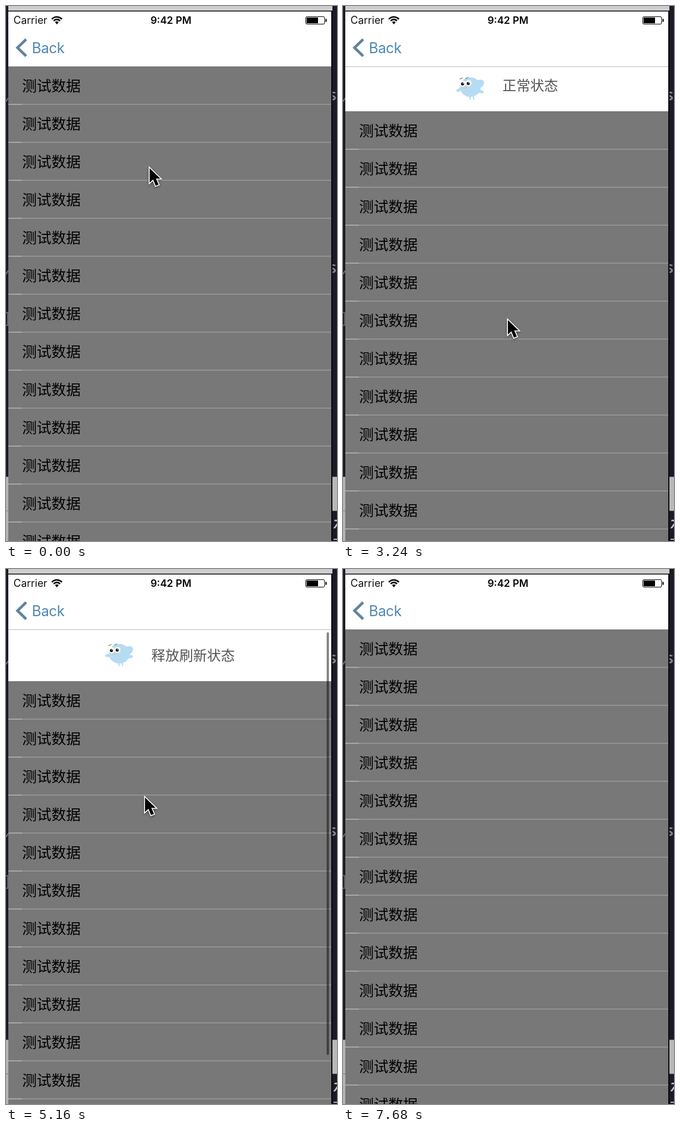
Write an HTML page with a canvas that moves like this. It is 576 px wide and 930 px high and loops after 7.74 s.

```html
<!DOCTYPE html>
<html lang="zh">
<head>
<meta charset="utf-8">
<title>下拉刷新</title>
<style>
html, body { margin: 0; width: 100%; height: 100%; overflow: hidden; background: #1c1a26; }
canvas { display: block; width: 576px; height: 930px; }
</style>
</head>
<body>
<canvas id="stage" width="576" height="930"></canvas>
<script>
const ctx = document.getElementById('stage').getContext('2d');
const LOOP = 7740, STEP = 60, TAU = Math.PI * 2;
const LEFT = 4, RIGHT = 566, WIDTH = RIGHT - LEFT, BOTTOM = 930;
const NAV = 105, ROW = 66, HEADER = 90;
const LATIN = 'Inter, Roboto, sans-serif';
const CJK = '"Noto Sans CJK SC", "Noto Sans CJK", "Noto Sans CJK JP", sans-serif';
const MONO = '"Noto Sans Mono", monospace';
const TINT = '#4a8cbc', BIRD = '#b5dcf2';

// Smooth step from 0 to 1 between two times
function ease(t, from, to) {
  const u = Math.min(1, Math.max(0, (t - from) / (to - from)));
  return u * u * (3 - 2 * u);
}

// First pull overshoots, settles on the header, then closes; the second is let down slowly
function pullAt(t) {
  const first = 120 * ease(t, 300, 1020) - 30 * ease(t, 1140, 1440)
    - HEADER * ease(t, 3180, 3447);
  const second = 91 * (ease(t, 4200, 5212) - ease(t, 6300, 7260));
  return first + second;
}

function barAlphaAt(t) {
  return ease(t, 300, 360) - ease(t, 1500, 1740) + ease(t, 4200, 4260) - ease(t, 7260, 7500);
}

function mouseAt(t) {
  let x = 249, y = 279;
  const glide = (from, to, toX, toY) => {
    const u = ease(t, from, to);
    x += (toX - x) * u;
    y += (toY - y) * u;
  };
  glide(300, 1020, 286, 543);
  glide(3300, 4140, 228, 298);
  glide(4200, 5212, 241, 395);
  glide(5800, 6780, 245, 378);
  glide(7140, 7620, 590, 430);
  return [x, y];
}

function rect(x, y, w, h, color) {
  ctx.fillStyle = color;
  ctx.fillRect(x, y, w, h);
}

function pill(x, y, w, h, r) {
  ctx.beginPath();
  ctx.roundRect(x, y, w, h, r);
}

function text(str, x, y, font, color, align = 'left') {
  ctx.font = font;
  ctx.fillStyle = color;
  ctx.textAlign = align;
  ctx.fillText(str, x, y);
}

function oval(x, y, rx, ry, color, turn = 0) {
  ctx.fillStyle = color;
  ctx.beginPath();
  ctx.ellipse(x, y, rx, ry, turn, 0, TAU);
  ctx.fill();
}

function line(x1, y1, x2, y2, width, color) {
  ctx.strokeStyle = color;
  ctx.lineWidth = width;
  ctx.beginPath();
  ctx.moveTo(x1, y1);
  ctx.lineTo(x2, y2);
  ctx.stroke();
}

function clipped(x, y, w, h, paint) {
  ctx.save();
  ctx.beginPath();
  ctx.rect(x, y, w, h);
  ctx.clip();
  paint();
  ctx.restore();
}

function drawBackdrop() {
  rect(0, 0, 576, BOTTOM, '#1c1a26');
  for (const y of [164, 464]) {
    text('S', 562, y, `bold 22px ${MONO}`, '#85888c');
    line(0, y + 2, LEFT, y - 4, 2, '#70737a');
  }
  ctx.strokeStyle = '#777a80';
  ctx.lineWidth = 1.5;
  ctx.strokeRect(-9, 533, 12, 22);
  rect(0, 818, LEFT, BOTTOM - 818, '#b4b4b4');
  rect(RIGHT, 818, 10, 60, '#b9b9b9');
  for (const y of [818, 877]) rect(0, y, 576, 1, '#777');
  text('7', 567, 908, `italic bold 21px ${MONO}`, '#c4c4c8');
  rect(570, 926, 6, 2, '#b4b4b8');
  rect(LEFT, 0, WIDTH + 2, 8, '#cdcdcd');
  rect(LEFT, 8, WIDTH + 2, BOTTOM, '#080808');
  rect(LEFT, 9.5, WIDTH, BOTTOM, '#fff');
}

function drawBird(x, y, lift) {
  ctx.save();
  ctx.translate(x, y + 3 - lift * 9);
  ctx.lineCap = 'round';
  for (const foot of [0, 6]) line(foot - 1, 13, foot, 21, 2.2, BIRD);
  // Wings, body and tail
  oval(-17, 4 - lift * 2, 8, 3, BIRD, lift * 0.4 - 0.4);
  oval(16, 7 - lift * 3, 8, 3, BIRD, 0.3 - lift * 0.5);
  oval(0, 0, 18, 17, BIRD);
  oval(15, -5, 10, 7, BIRD, -0.6);
  // Brows and eyes
  for (const ex of [-13, -3]) {
    const ey = -7 - ex / 13;
    line(ex - 5, ey - 8, ex - 1, ey - 10, 1.5, '#8b8f94');
    oval(ex, ey, 5.3, 5.3, '#fff');
    oval(ex - 0.5, ey + 0.5, 2.7, 2.7, '#151515');
    oval(ex + 0.4, ey - 0.6, 0.8, 0.8, '#fff');
  }
  oval(-9, 1, 3, 1.7, '#d9c8b0', -0.2);
  ctx.restore();
}

function drawHeader(top, offset, t) {
  const ready = offset >= HEADER - 0.5;
  const label = ready ? '释放刷新状态' : '正常状态';
  const x = ready ? 253 : 277.5;
  const mid = top - HEADER / 2;
  const lift = ready ? (1 - Math.cos((t - 1020) / 499 * TAU)) / 2 : 0;
  const write = () => text(label, x, mid + 9, `24.2px ${CJK}`, '#555');
  clipped(LEFT, NAV, WIDTH, BOTTOM - NAV, () => {
    drawBird(x - 56, mid, lift);
    write();
  });
  // Faint blur of the label behind the translucent bar
  clipped(LEFT, 86, WIDTH, NAV - 86, () => {
    ctx.globalAlpha = 0.12;
    ctx.filter = 'blur(7px)';
    write();
  });
}

function drawList(top) {
  rect(LEFT, top, WIDTH, BOTTOM - top, '#787878');
  for (let y = top; y < BOTTOM; y += ROW) {
    text('测试数据', 28, y + 43, `25.5px ${CJK}`, '#000');
    rect(LEFT, y + ROW - 0.5, WIDTH, 1, '#acacac');
    rect(LEFT, y + ROW - 0.5, 24, 1, '#c0c0c0');
  }
}

function drawSignal(x, y) {
  const fan = r => ctx.arc(x, y, r, -TAU * 0.38, -TAU * 0.12);
  ctx.strokeStyle = ctx.fillStyle = '#000';
  ctx.lineWidth = 2.6;
  for (const r of [12, 7.6]) {
    ctx.beginPath();
    fan(r);
    ctx.stroke();
  }
  ctx.beginPath();
  ctx.moveTo(x, y + 1);
  fan(4.3);
  ctx.fill();
}

function drawBattery(x, y) {
  ctx.strokeStyle = '#000';
  ctx.lineWidth = 1;
  pill(x + 0.5, y + 0.5, 33, 13, 2.5);
  ctx.stroke();
  rect(x + 2, y + 2, 20, 10, '#000');
  rect(x + 35, y + 4.5, 2, 5, '#000');
}

function drawNav(offset) {
  text('Carrier', 13, 31, `18px ${LATIN}`, '#111');
  text('9:42 PM', 287, 31, `600 17.5px ${LATIN}`, '#050505', 'center');
  drawSignal(88.5, 31);
  drawBattery(521, 18);
  // Grey chevron with a blue rim
  const chevron = new Path2D('M35 58 L20 72.5 L35 87');
  for (const [width, color] of [[4.6, TINT], [2.4, '#7a7c7e']]) {
    ctx.lineWidth = width;
    ctx.strokeStyle = color;
    ctx.stroke(chevron);
  }
  ctx.letterSpacing = '-0.4px';
  text('Back', 45, 81.5, `25px ${LATIN}`, '#4f88b3');
  ctx.letterSpacing = '0px';
  if (offset > 0.5) rect(LEFT, NAV, WIDTH, 1, '#bcbcbc');
}

function drawBar(offset, alpha) {
  ctx.fillStyle = `rgba(0,0,0,${0.47 * alpha})`;
  pill(558, 110, 4, 825 - offset, 2);
  ctx.fill();
}

function drawCursor(x, y) {
  const arrow = new Path2D('M1 3 V28 L7 22.5 L11.5 33.5 L16.5 31.5 L12 21 H19.5 Z');
  ctx.save();
  ctx.translate(x, y);
  ctx.lineWidth = 3.2;
  ctx.strokeStyle = '#fff';
  ctx.shadowColor = 'rgba(0,0,0,.4)';
  ctx.shadowBlur = 4;
  ctx.shadowOffsetY = 2;
  ctx.stroke(arrow);
  ctx.shadowColor = 'transparent';
  ctx.fillStyle = '#000';
  ctx.fill(arrow);
  ctx.restore();
}

function draw(now) {
  const t = Math.floor(now % LOOP / STEP) * STEP;
  const offset = pullAt(t);
  const top = NAV + Math.round(offset);
  drawBackdrop();
  if (top > NAV) drawHeader(top, offset, t);
  drawList(top);
  drawNav(offset);
  drawBar(offset, barAlphaAt(t));
  drawCursor(...mouseAt(t));
}

let start;
function tick(now) {
  start ??= now;
  draw(now - start);
  requestAnimationFrame(tick);
}
draw(0);
requestAnimationFrame(tick);
</script>
</body>
</html>
```
